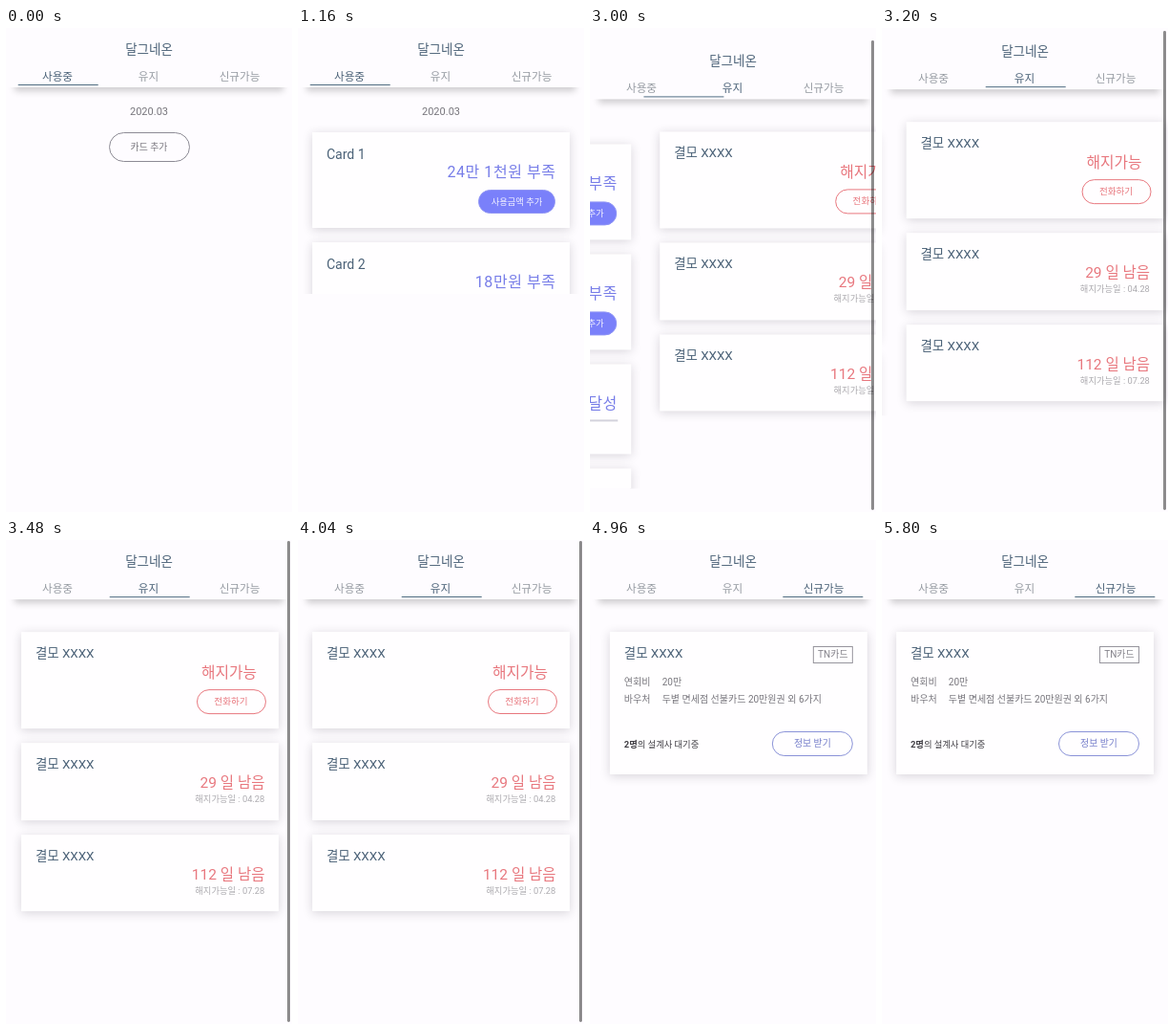
An HTML page for the animation above (5.84 s loop, 300 by 506 pixels).

```html
<!DOCTYPE html>
<html lang="ko">
<head>
<meta charset="utf-8">
<style>
html, body { margin: 0; width: 100%; height: 100%; overflow: hidden; background: #fefcff; }
body { font-family: Roboto, "Noto Sans CJK KR", "Noto Sans CJK", sans-serif; }
div { position: absolute; box-sizing: border-box; }
#stage { left: 0; top: 0; width: 300px; height: 506px; overflow: hidden; background: #fefcff; }
#app, #strip, .page { left: 0; top: 0; width: 300px; height: 600px; }
#view { left: 0; top: 0; width: 300px; overflow: hidden; }
#head { left: 0; top: -30px; width: 300px; height: 92px; background: #fefcff; }
#shade { left: 9px; top: 50px; width: 282px; height: 12px; box-shadow: 0 4px 7px rgba(0,0,0,.19); }
#line { left: 0; top: 58.6px; width: 83.5px; height: 1.8px; background: #4f6c80; }
#bar { left: 295px; width: 2.7px; border-radius: 1.4px; background: #000; }
.card { left: 15px; width: 270px; background: #fffeff; box-shadow: 0 2px 10px rgba(40,35,50,.18); }
.t { height: 20px; line-height: 20px; white-space: pre; }
b { font-weight: 700; }
</style>
</head>
<body>
<div id="stage">
  <div id="app">
    <div id="view"><div id="strip"></div></div>
    <div id="shade"></div>
    <div id="head"></div>
    <div id="line"></div>
  </div>
  <div id="bar"></div>
</div>
<script>
const LOOP = 5840, OPEN = 1045, SWIPES = [2780, 4471], SWITCH = 80;
const INK = '#4a6177', BLUE = '#777de8', RED = '#e8777e', PALE = '#acaaaf', TEXT = '#77757c';
const $ = id => document.getElementById(id);

function add(parent, cls, css, html = '') {
  const el = document.createElement('div');
  el.className = cls;
  el.style.cssText = css;
  el.innerHTML = html;
  parent.append(el);
  return el;
}

// x is the left edge, centre or right edge; y is the vertical centre
function text(parent, str, x, y, size, color, align = 'l', weight = 400, extra = '') {
  const shift = { l: 0, c: -50, r: -100 }[align];
  return add(parent, 't', `left:${x}px;top:${y - 10}px;font-size:${size}px;color:${color};` +
    `font-weight:${weight};transform:translateX(${shift}%);${extra}`, str);
}

function pill(parent, str, x, y, w, h, size, color, fill, border) {
  add(parent, '', `left:${x}px;top:${y}px;width:${w}px;height:${h}px;border-radius:${h / 2}px;` +
    `background:${fill};border:1px solid ${border}`);
  text(parent, str, x + w / 2, y + h / 2, size, color, 'c');
}

function card(parent, y, h, title, size) {
  add(parent, 'card', `top:${y}px;height:${h}px`);
  text(parent, title, 30, y + 23.4, size, INK);
}

const pages = [0, 1, 2].map(i => add($('strip'), 'page', `left:${i * 300}px`));
const [using, keep, fresh] = pages;

// In use
text(using, '2020.03', 150, 87.8, 11, TEXT, 'c');
const empty = add(using, 'page', '');
const list = add(using, 'page', '');
pill(empty, '카드 추가', 107.5, 109, 85, 31, 9.9, TEXT, 'none', '#8d8b95');
[[109, '24만 1천원 부족'], [224, '18만원 부족'], [339, '달성'], [448, '33만 8천원 부족']]
  .forEach(([y, sum], i) => {
    const done = i === 2;
    card(list, y, done ? 94 : 100, 'Card ' + (i + 1), 14);
    text(list, sum, 270.5, y + 41.7, 16, BLUE, 'r', 400, 'letter-spacing:.55px');
    if (done) {
      add(list, '', `left:30px;top:${y + 58}px;width:241px;height:1.5px;background:#d3d2dc`);
      text(list, '09.28 입금 예정', 30, y + 72, 9.3, PALE);
    } else {
      pill(list, '사용금액 추가', 189, y + 60, 81, 25, 9.3, '#f4f3ff', '#7a80fa', '#8f94f4');
    }
  });

// Keep
card(keep, 96, 101, '결모 XXXX', 13.4);
text(keep, '해지가능', 233, 138.6, 15.8, RED, 'c', 500);
pill(keep, '전화하기', 198.5, 156, 73, 26, 9.6, RED, 'none', RED);
[[212, '29', '04.28'], [307.5, '112', '07.28']].forEach(([y, days, date]) => {
  card(keep, y, 80.5, '결모 XXXX', 13.4);
  text(keep, days + ' 일 남음', 270.5, y + 42.3, 15.5, RED, 'r');
  text(keep, '해지가능일 : ' + date, 270.3, y + 59.2, 9.3, PALE, 'r');
});

// New
card(fresh, 96, 149, '결모 XXXX', 13.4);
add(fresh, '', 'left:228px;top:111px;width:42px;height:18px;border:1px solid #97959d');
text(fresh, 'TN카드', 249, 120, 10, '#85838b', 'c');
[[148.5, '연회비', '20만'], [167.3, '바우처', '두볕 면세점 선불카드 20만원권 외 6가지']].forEach(([y, key, val]) => {
  text(fresh, key, 30, y, 10, TEXT);
  text(fresh, val, 69.8, y, 10, TEXT);
});
text(fresh, '<b>2명</b>의 설계사 대기중', 30, 214.2, 9.3, '#3f3d43');
pill(fresh, '정보 받기', 185, 200, 85, 26, 9.9, '#747dca', 'none', '#8b93d8');

// Header
text($('app'), '달그네온', 150, 21.7, 13.5, INK, 'c');
const tabs = [['사용중', 54], ['유지', 149.5], ['신규가능', 245]]
  .map(([name, x]) => text($('app'), name, x, 51, 11.6, INK, 'c'));

const clamp = v => Math.min(1, Math.max(0, v));
const ramp = (t, from, dur) => clamp((t - from) / dur);
const smooth = p => p * p * (3 - 2 * p);
const ease = (t, from) => smooth(ramp(t, from, 300));

// Finger drag for 120 ms, then a decaying glide to the next page
function swipe(t) {
  if (t <= 0) return 0;
  return t < 120 ? .54 * (t / 120) ** 1.3 : 1 - .46 * Math.exp((120 - t) / 117);
}

// Vertical overscroll pulled along by the first drag
function bounce(t) {
  if (t <= 0) return 0;
  if (t < 120) return 19.4 * smooth(t / 120);
  const k = (t - 120) / 80;
  return 19.4 * (1 + k) * Math.exp(-k);
}

function draw(t) {
  const [a, b] = SWIPES;
  const pos = swipe(t - a) + swipe(t - b);
  const dy = bounce(t - a);
  const tab = (t >= a + SWITCH) + (t >= b + SWITCH);
  const e1 = ease(t, a + SWITCH), e2 = ease(t, b + SWITCH);

  $('app').style.transform = `translateY(${dy}px)`;
  $('strip').style.transform = `translateX(${-300 * pos}px)`;
  $('view').style.height = 155 + 370 * ease(t, OPEN) - 122 * e1 - 143 * e2 + 'px';
  $('line').style.transform = `translateX(${12.7 + 96 * e1 + 93.6 * e2}px)`;
  tabs.forEach((el, i) => el.style.color = i === tab ? INK : '#969ba2');
  empty.style.display = t < OPEN ? '' : 'none';
  list.style.display = t < OPEN ? 'none' : '';

  const bar = $('bar').style;
  bar.top = 1 + dy + 'px';
  bar.height = 503 - dy + 'px';
  bar.opacity = .45 * ramp(t, a, 60) * (1 - ramp(t, 4385, 250));
}

const start = performance.now();
function tick() {
  draw((performance.now() - start) % LOOP);
  requestAnimationFrame(tick);
}
tick();
</script>
</body>
</html>
```
